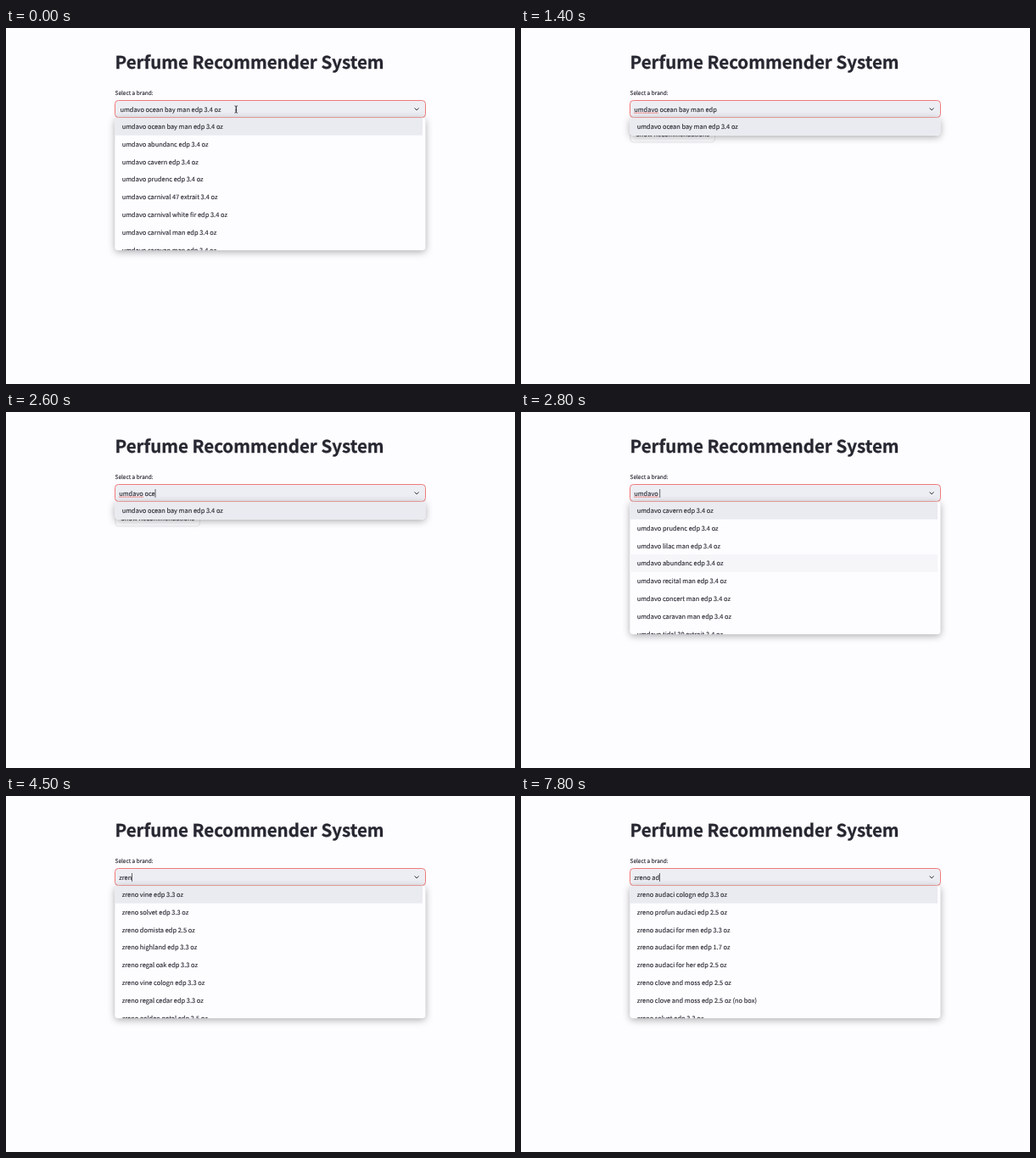
Recreate the animation shown at these times as an HTML page. Size 600x420 px, loop 8000 ms.

```html
<!DOCTYPE html>
<html lang="en">
<head>
<meta charset="utf-8">
<title>Perfume Recommender System</title>
<style>
  html, body { margin: 0; width: 100%; height: 100%; overflow: hidden; background: #fdfcff; }
  svg { display: block; width: 600px; height: 420px; }
  text {
    font: 7.45px "Noto Sans CJK SC", "Noto Sans CJK JP", "Noto Sans CJK", "Noto Sans", sans-serif;
    fill: #262730; stroke: #262730; stroke-width: .12px;
    white-space: pre; text-rendering: geometricPrecision;
  }
  #title { font-size: 20.5px; font-weight: 700; stroke-width: .3px; }
  #label { font-size: 6.52px; }
  #panel { fill: #fdfcff; filter: drop-shadow(0 2px 4px rgba(0, 0, 0, .32)); }
  .line { fill: none; stroke: #31333f; }
</style>
</head>
<body>
<svg viewBox="0 0 600 420">
  <defs><clipPath id="clip"><rect id="clipBox" x="128.3" y="105.8" width="366.2" rx="4"/></clipPath></defs>
  <text id="title" x="128.5" y="47.7">Perfume Recommender System</text>
  <text id="label" x="128.5" y="79.4">Select a brand:</text>
  <rect x="128.8" y="114.8" width="99.8" height="20" rx="4" fill="#fdfcff" stroke="#d6d6db" stroke-width=".6"/>
  <text x="135.5" y="127.9">Show Recommendations</text>
  <rect x="128.5" y="85.5" width="366" height="20" rx="4" fill="#edeef3" stroke="#f07a7a"/>
  <path class="line" d="M481.6 94.5l2.5 2.4 2.5-2.4"/>
  <text id="input" y="98.6"></text>
  <path id="spell" stroke="#f0524f" stroke-width="1" stroke-dasharray="1.3 .8"/>
  <rect id="caret" y="91" width=".7" height="10" fill="#262730"/>
  <rect id="panel" x="128.3" y="105.8" width="366.2" rx="4"/>
  <g clip-path="url(#clip)">
    <rect id="active" x="128" y="105.8" height="20.8" fill="#eaebf0"/>
    <rect id="hover" x="128" y="168.2" width="363" height="20.8" fill="#f6f6f9"/>
    <g id="rows"></g>
  </g>
  <path id="pointer" class="line" stroke-width=".9" d="M-1.8-4.2Q0-4.2 0-3V3Q0 4.2-1.8 4.2M1.8-4.2Q0-4.2 0-3V3Q0 4.2 1.8 4.2M-1 .9H1"/>
</svg>
<script>
const $ = id => document.getElementById(id);
const LOOP = 8000, TICK = 100, ROW = 20.8, MAX = 156.4;

const brandA = names => names.map(n => `umdavo ${n} 3.4 oz`);
const brandZ = names => names.map(n => `zreno ${n}`);
const scents = ["audaci cologn edp 3.3 oz", "profun audaci edp 2.5 oz", "audaci for men edp 3.3 oz",
  "audaci for men edp 1.7 oz", "audaci for her edp 2.5 oz", "clove and moss edp 2.5 oz",
  "clove and moss edp 2.5 oz (no box)"];

const lists = {
  all: brandA(["ocean bay man edp", "abundanc edp", "cavern edp", "prudenc edp", "carnival 47 extrait",
    "carnival white fir edp", "carnival man edp", "caravan man edp"]),
  one: brandA(["ocean bay man edp"]),
  few: brandA(["ocean bay man edp", "abundanc edp", "tidal 30 extrait", "carnival white fir edp"]),
  brand: brandA(["cavern edp", "prudenc edp", "lilac man edp", "abundanc edp", "recital man edp",
    "concert man edp", "caravan man edp", "tidal 30 extrait"]),
  z: brandZ(["vine edp 3.3 oz", "solvet edp 3.3 oz", "domista edp 2.5 oz", "highland edp 3.3 oz",
    "regal oak edp 3.3 oz", "vine cologn edp 3.3 oz", "regal cedar edp 3.3 oz", "golden petal edp 2.5 oz"]),
  za: brandZ([...scents, "domista edp 2.5 oz"]),
  zad: brandZ([...scents, "solvet edp 3.3 oz"])
};
const chosen = lists.one[0];

// [start, value]
const listSteps = [[0, "all"], [500, "one"], [2700, "few"], [2800, "brand"], [3400, "all"],
  [3700, "z"], [6100, "za"], [6600, "zad"]];
const typeSteps = [[3400, 0], [3700, 1], [4000, 2], [4300, 3], [4500, 4], [4700, 5], [5900, 6], [6100, 7], [6600, 8]];
const pointerSteps = [[0, [271.3, 96]], [500, null], [5300, [269, 102]], [5500, [267, 103]], [5800, null]];
const caretOff = [[0, 500], [1400, 1500], [3500, 3700], [5200, 5700], [7100, 7600]];

const at = (steps, t) => steps.filter(s => s[0] <= t).pop()[1];
const show = (el, on) => el.setAttribute("visibility", on ? "visible" : "hidden");

function typed(t) {
  if (t < 500) return "";
  if (t >= 3400) return "zreno ad".slice(0, at(typeSteps, t));
  const left = t < 800 ? 30
    : t < 1400 ? Math.max(24, 29 - (t - 800) / 100)
    : Math.round(24 - (t - 1400) * 13 / 1100);
  return chosen.slice(0, left);
}

const rows = lists.all.map((_, i) => {
  const row = document.createElementNS("http://www.w3.org/2000/svg", "text");
  row.setAttribute("x", 136.7);
  row.setAttribute("y", 118.9 + i * ROW);
  return $("rows").appendChild(row);
});

function drawList(name) {
  const list = lists[name];
  const height = Math.min(list.length * ROW + .2, MAX);
  $("panel").setAttribute("height", height);
  $("clipBox").setAttribute("height", height);
  $("active").setAttribute("width", list.length > 7 ? 363 : 367);
  show($("hover"), name === "brand");
  rows.forEach((row, i) => row.textContent = list[i] || "");
}

function drawInput(t) {
  const text = typed(t), input = $("input");
  input.textContent = text || chosen;
  input.setAttribute("x", text ? 133.2 : 134.4);
  const width = text ? input.getComputedTextLength() : 0;
  $("caret").setAttribute("x", 133.2 + width);
  show($("caret"), !caretOff.some(([a, b]) => t >= a && t < b));
  const misspelt = text.length > 6 && text[0] === "u";
  show($("spell"), misspelt);
  if (misspelt) $("spell").setAttribute("d", `M133.4 100.2H${133.2 + input.getSubStringLength(0, 6)}`);
}

function drawPointer(pos) {
  show($("pointer"), pos);
  if (pos) $("pointer").setAttribute("transform", `translate(${pos})`);
}

let last = -1;
function frame() {
  const t = Math.floor(performance.now() % LOOP / TICK) * TICK;
  if (t !== last) {
    last = t;
    drawList(at(listSteps, t));
    drawInput(t);
    drawPointer(at(pointerSteps, t));
  }
  requestAnimationFrame(frame);
}
frame();
</script>
</body>
</html>
```
